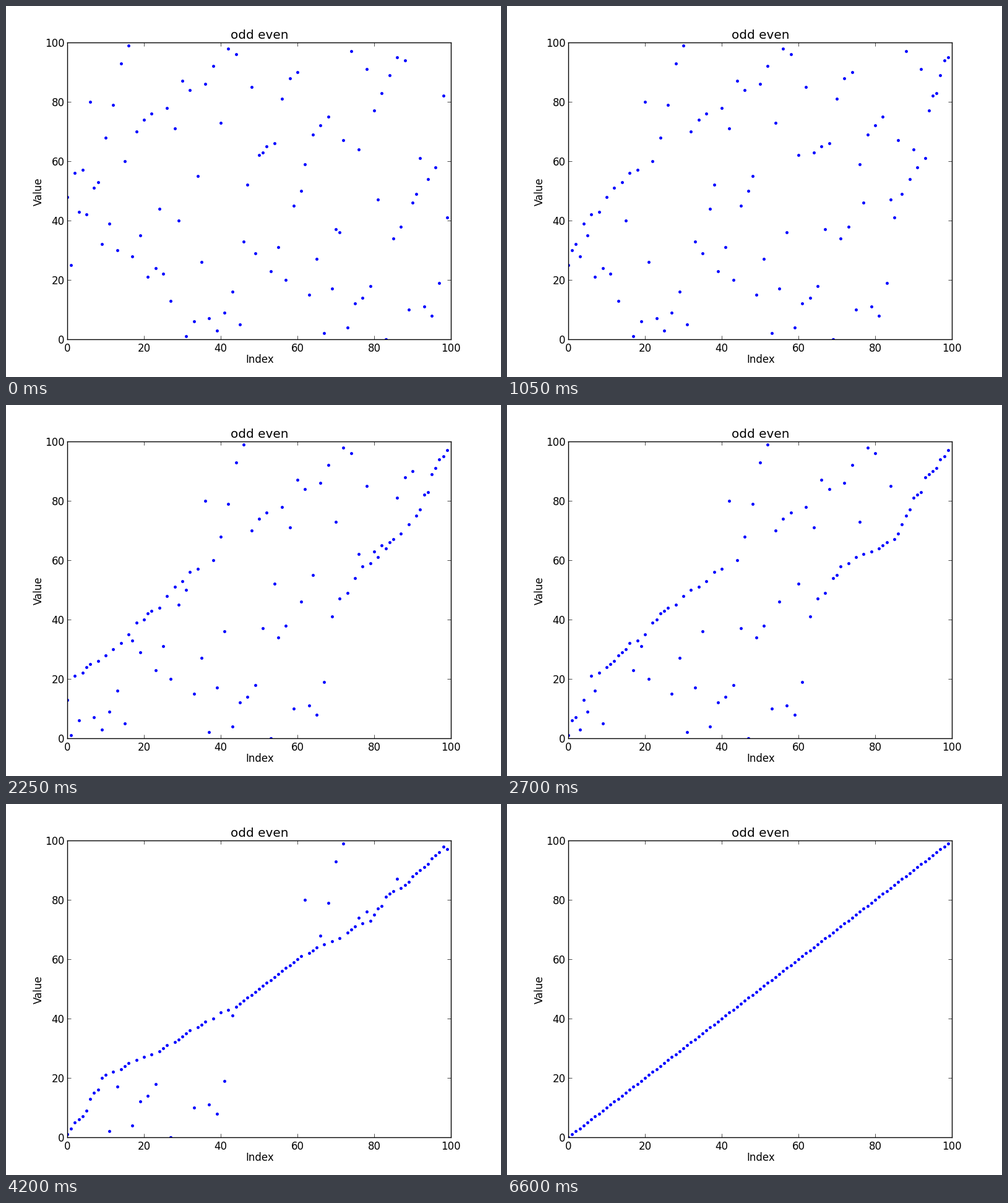
Recreate the animation shown at these times as a matplotlib script. Size 800x600 px, loop 6900 ms.

```python
import numpy as np
import matplotlib.pyplot as plt
from matplotlib.animation import FuncAnimation

W, H, DPI = 800, 600, 100
N = 100
FRAMES, INTERVAL = 46, 150

plt.rcParams.update({"font.family": "DejaVu Sans", "font.size": 12})

START = [
    48, 25, 56, 43, 57, 42, 80, 51, 53, 32, 68, 39, 79, 30, 93, 60, 99, 28, 70, 35,
    74, 21, 76, 24, 44, 22, 78, 13, 71, 40, 87, 1, 84, 6, 55, 26, 86, 7, 92, 3,
    73, 9, 98, 16, 96, 5, 33, 52, 85, 29, 62, 63, 65, 23, 66, 31, 81, 20, 88, 45,
    90, 50, 59, 15, 69, 27, 72, 2, 75, 17, 37, 36, 67, 4, 97, 12, 64, 14, 91, 18,
    77, 47, 83, 0, 89, 34, 95, 38, 94, 10, 46, 49, 61, 11, 54, 8, 58, 19, 82, 41,
]


def compare_pairs(a, first):
    """Order every neighbouring pair, beginning at index `first`."""
    for i in range(first, len(a) - 1, 2):
        if a[i] > a[i + 1]:
            a[i], a[i + 1] = a[i + 1], a[i]


def odd_even_states(values, count):
    a = list(values)
    states = [np.array(a)]
    while len(states) < count:
        compare_pairs(a, 0)
        compare_pairs(a, 1)
        states.append(np.array(a))
    return states


def dot_offsets(values):
    """Data coordinates of the dots, centred on whole pixels."""
    x = (np.round(6.2 * np.arange(N)) + 0.5) / 6.2
    y = (np.round(4.8 * values) - 0.5) / 4.8
    return np.column_stack([x, y])


def label(x, y, text, size=12, rotation=0):
    fig.text(x / W, 1 - y / H, text, size=size, rotation=rotation,
             ha="center", va="baseline", rotation_mode="anchor")


states = odd_even_states(START, FRAMES)

fig = plt.figure(figsize=(W / DPI, H / DPI), dpi=DPI, facecolor="white")
ax = fig.add_axes([99 / W, 61 / H, 620 / W, 480 / H])
ax.set(xlim=(0, 100), ylim=(0, 100),
       xticks=range(0, 101, 20), yticks=range(0, 101, 20))
ax.set_axisbelow(False)
ax.tick_params(direction="in", length=4, width=0.5, top=True, right=True)
ax.tick_params(axis="x", pad=4)
ax.tick_params(axis="y", pad=3.3)
for spine in ax.spines.values():
    spine.set_linewidth(1.0)

label(410, 53, "odd even", size=14.4)
label(410, 577, "Index")
label(58, 300, "Value", rotation=90)

start = dot_offsets(states[0])
dots = ax.scatter(start[:, 0], start[:, 1], s=np.full(N, 9.0),
                  facecolor="blue", edgecolor="blue", linewidth=0.5)
dots.set_snap(False)


def update(frame):
    dots.set_offsets(dot_offsets(states[frame]))
    return (dots,)


anim = FuncAnimation(fig, update, frames=FRAMES, interval=INTERVAL,
                     repeat=True, repeat_delay=0, blit=False)
plt.show()
```
